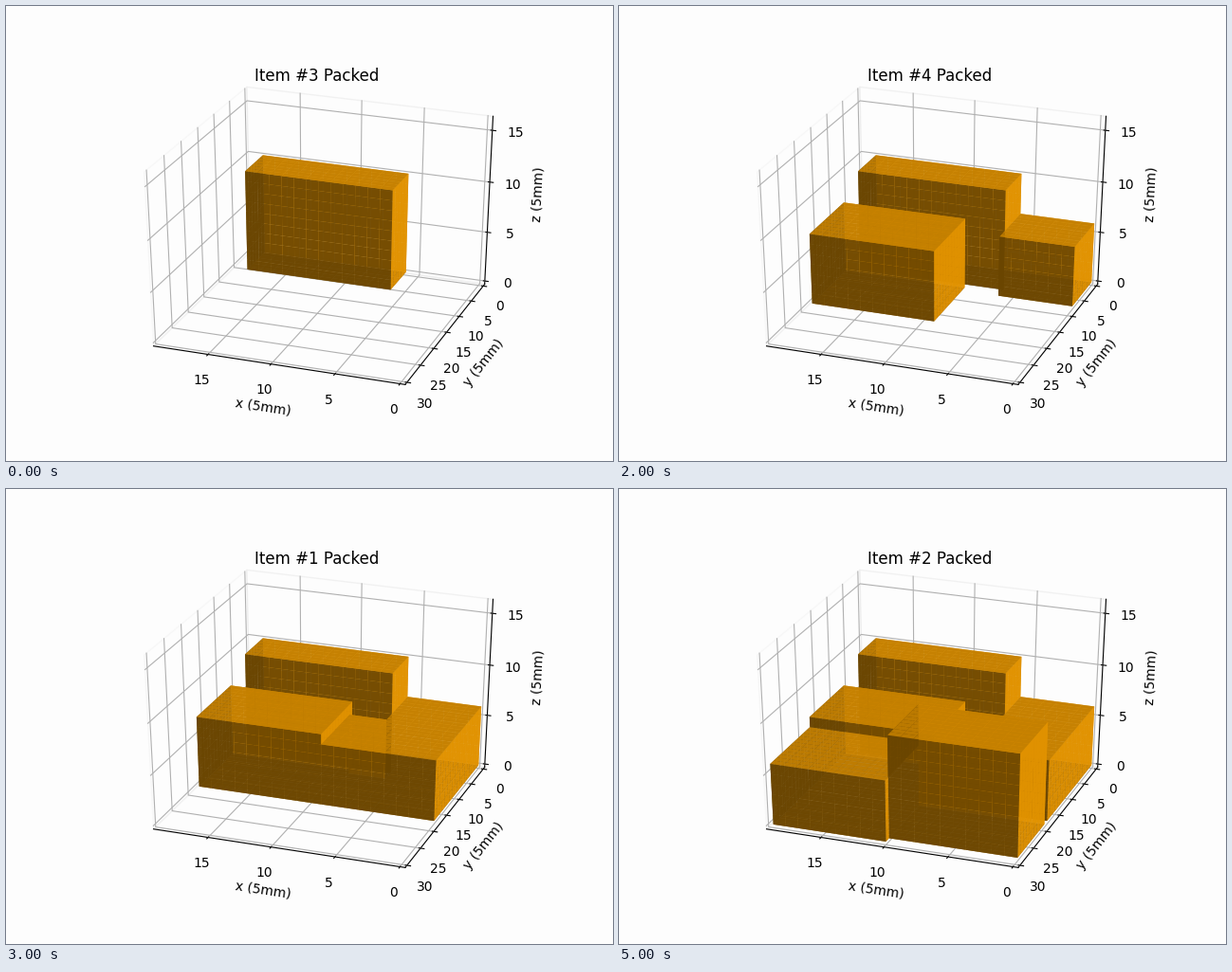
A matplotlib script for the animation above (6000 ms loop, 640 px wide and 480 px high).

```python
import numpy as np
import matplotlib.pyplot as plt
from matplotlib.animation import FuncAnimation
from matplotlib.collections import PolyCollection

W, H, DPI = 640, 480, 100
SIZE = np.array([19, 30, 16])
ELEV, AZIM, DIST = np.radians(30), np.radians(110), 10
HALF = 0.5 * 25 / 24          # half width of the drawn box
STEP = 1 / 12                 # unit of tick and label offsets
PER_POINT = 48 / (72 * (4.96 + 3.696))
ALPHA = 0.9
ORANGE = np.array([1, 165 / 255, 0])
LIGHT = np.array([-2, -2, 1]) / 3

# label, low corner, high corner, in packing order
ITEMS = [
    (3, (6, 0, 0), (18, 6, 10)),
    (5, (0, 0, 0), (6, 8, 6)),
    (4, (9, 7, 0), (19, 18, 7)),
    (1, (0, 8, 0), (9, 18, 6)),
    (0, (0, 19, 0), (10, 29, 10)),
    (2, (10, 18, 0), (19, 30, 6)),
]

ce, se, ca, sa = np.cos(ELEV), np.sin(ELEV), np.cos(AZIM), np.sin(AZIM)
RIGHT = np.array([-sa, ca, 0])
UP = np.array([-se * ca, -se * sa, ce])
TOWARD = np.array([ce * ca, ce * sa, se])


def project(p):
    """Unit-cube points centred on zero -> pixel x, y and depth."""
    p = np.asarray(p, float)
    depth = DIST - p @ TOWARD
    x = 80 + (p @ RIGHT / depth + 0.095) / 0.185 * 496
    y = 427.2 - (p @ UP / depth + 0.095) / 0.185 * 369.6
    return np.stack([x, y], -1), depth


def exposed_faces(filled):
    """Outer faces of the filled cells, far to near, with their colours."""
    pad = np.pad(filled, 1)
    corners, colors, owners = [], [], []
    for axis in range(3):
        b, c = (axis + 1) % 3, (axis + 2) % 3
        for sign in (-1, 1):
            near = np.roll(pad, -sign, axis)[1:-1, 1:-1, 1:-1]
            cells = np.argwhere(filled & ~near)
            quad = np.zeros((4, 3))
            quad[:, axis] = sign > 0
            quad[[1, 2], b] = 1
            quad[[2, 3], c] = 1
            corners.append(cells[:, None, :] + quad)
            shade = 0.3 + 0.35 * (1 + sign * LIGHT[axis])
            colors.append(np.tile([*(shade * ORANGE), ALPHA], (len(cells), 1)))
            owners.append(np.ravel_multi_index(cells.T, filled.shape))
    corners, colors, owners = map(np.concatenate, (corners, colors, owners))
    xy, depth = project(corners / SIZE - 0.5)
    nearest = np.full(filled.size, np.inf)
    np.minimum.at(nearest, owners, depth.min(1))
    order = np.lexsort((-depth.mean(1), owners, -nearest[owners]))
    return xy[order], colors[order]


fig = plt.figure(figsize=(W / DPI, H / DPI), dpi=DPI, facecolor="#fdfdfd")
ax = fig.add_axes([0, 0, 1, 1])
ax.set_xlim(0, W)
ax.set_ylim(H, 0)
ax.axis("off")


def line(points, **style):
    xy, _ = project(points)
    ax.plot(xy[:, 0], xy[:, 1], **style)


def outward(p, along, points):
    """Push a point away from the centre, except along its own axis."""
    p = np.array(p, float)
    move = np.sign(p) * points * PER_POINT * STEP
    move[along] = 0
    return project(p + move)[0]


def text(xy, s, **style):
    ax.text(*xy, s, family="DejaVu Sans", ha="center", **style)


def draw_pane(axis, side, gray):
    b, c = [i for i in range(3) if i != axis]
    pts = np.full((5, 3), side * HALF)
    pts[:, b] = np.array([-1, 1, 1, -1, -1]) * HALF
    pts[:, c] = np.array([-1, -1, 1, 1, -1]) * HALF
    line(pts, color=str(gray), alpha=0.5, lw=1)


def draw_axis(axis, name, start, end, tick_axis, grid, step):
    """One axis: line, label, grid, ticks and tick labels."""
    start, end = np.array(start) * HALF, np.array(end) * HALF
    line([start, end], color="k", lw=0.8, solid_capstyle="projecting")

    (x0, y0), (x1, y1) = project([start, end])[0]
    angle = np.degrees(np.arctan2(y0 - y1, x1 - x0))
    text(outward((start + end) / 2, axis, 25), f"{name} (5mm)", size=10,
         va="center", rotation=angle, rotation_mode="anchor")

    values = range(0, SIZE[axis] + 1, step)
    for v in values:
        w = v / SIZE[axis] - 0.5
        pts = np.array(grid, float) * HALF
        pts[:, axis] = w
        line(pts, color="#b0b0b0", lw=0.8, solid_joinstyle="round")
    for v in values:
        pos = start.copy()
        pos[axis] = v / SIZE[axis] - 0.5
        ends = np.array([pos, pos])
        ends[:, tick_axis] += np.sign(pos[tick_axis]) * STEP * np.array([0.2, -0.1])
        line(ends, color="k", lw=0.8, solid_capstyle="butt")
        text(outward(pos, axis, 11.5), str(v), size=10, va="top")


draw_pane(0, 1, 0.95)
draw_pane(1, -1, 0.9)
draw_pane(2, -1, 0.925)
draw_axis(0, "x", (-1, 1, -1), (1, 1, -1), 1,
          [(0, 1, -1), (0, -1, -1), (0, -1, 1)], 5)
draw_axis(1, "y", (-1, 1, -1), (-1, -1, -1), 0,
          [(-1, 0, -1), (1, 0, -1), (1, 0, 1)], 5)
draw_axis(2, "z", (-1, -1, -1), (-1, -1, 1), 0,
          [(1, 1, 0), (1, -1, 0), (-1, -1, 0)], 5)
# x labels read right to left, so turn the label upright
for t in ax.texts:
    if t.get_text().startswith("x"):
        t.set_rotation((t.get_rotation() + 90) % 180 - 90)

boxes = PolyCollection([], linewidths=0, antialiaseds=True, zorder=5)
ax.add_collection(boxes, autolim=False)
title = ax.text(328, 79, "", family="DejaVu Sans", size=12, ha="center",
                va="baseline")


def update(i):
    filled = np.zeros(SIZE, bool)
    for _, lo, hi in ITEMS[:i + 1]:
        filled[tuple(slice(a, b) for a, b in zip(lo, hi))] = True
    xy, colors = exposed_faces(filled)
    boxes.set_verts(xy)
    boxes.set_facecolor(colors)
    title.set_text(f"Item #{ITEMS[i][0]} Packed")
    return boxes, title


anim = FuncAnimation(fig, update, frames=len(ITEMS), interval=1000,
                     init_func=lambda: update(0), repeat=True)
plt.show()
```
